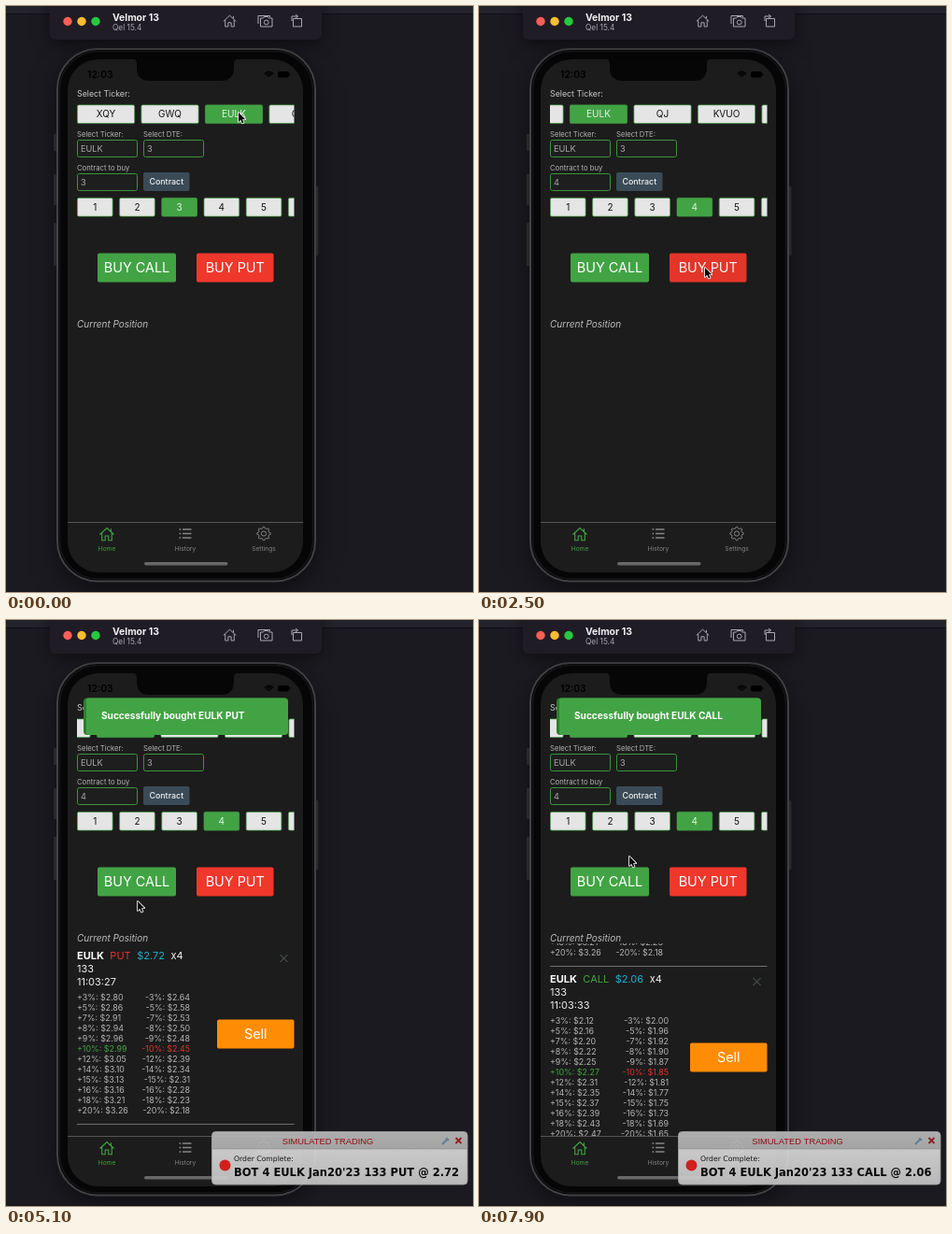
Recreate the animation shown at these times as an HTML page with a canvas. Size 500 by 627 pixels, loop 8 s.

```html
<!DOCTYPE html>
<html lang="en">
<head>
<meta charset="utf-8">
<title>Trading app demo</title>
<style>
  html, body { margin: 0; width: 100%; height: 100%; overflow: hidden; background: #1b1a20; }
  canvas { display: block; }
</style>
</head>
<body>
<canvas id="stage" width="500" height="627"></canvas>
<script>
const ctx = document.getElementById('stage').getContext('2d');
const LOOP = 8000, STEP = 100;
const UI = 'Inter, Roboto, sans-serif';
const WIDE = '"DejaVu Sans", sans-serif';
const GREEN = '#42a344', RED = '#f0372c', PALE = '#e5e5e5', SCREEN = '#1c1c1c';
const TICKERS = ['XQY', 'GWQ', 'EULK', 'QJ', 'KVUO', 'YZLU'];
const PICK = TICKERS[2];
const PERCENTS = [3, 5, 7, 8, 9, 10, 12, 14, 15, 16, 18, 20];

// Keyframes: [time, value, value...], eased between neighbours
const CURSOR = [
  [0, 249, 113], [500, 105, 115], [1000, 234, 218], [1700, 234, 218],
  [2400, 242, 279], [2700, 242, 279], [3400, 218, 298], [4400, 218, 298],
  [5000, 141, 300], [5300, 141, 300], [5600, 141, 281], [5800, 141, 281],
  [6300, 150, 434], [6600, 150, 434], [6700, 155, 460], [7100, 158, 487],
  [7200, 158, 487], [7900, 161, 252]
];
const CAROUSEL = [[0, 0], [600, 178], [1000, 166], [1600, 116]];
const LIST = [[7400, 0], [7900, 170]];
const NOTICE = [[2900, 627], [3300, 547]];
const TOAST_IN = [[3100, 15], [3500, 84.5], [3600, 83.5]];
const TOAST_AGAIN = [[7800, 75], [7900, 83.5]];

function track(keys, t) {
  let i = 0;
  while (i < keys.length - 1 && keys[i + 1][0] <= t) i++;
  const a = keys[i], b = keys[i + 1];
  if (!b || t <= a[0]) return a.slice(1);
  const p = (t - a[0]) / (b[0] - a[0]), e = p * p * (3 - 2 * p);
  return a.slice(1).map((v, k) => v + (b[k + 1] - v) * e);
}

function box(x, y, w, h, r, fill, stroke, line = 1) {
  ctx.beginPath();
  ctx.roundRect(x, y, w, h, r);
  if (fill) { ctx.fillStyle = fill; ctx.fill(); }
  if (stroke) { ctx.strokeStyle = stroke; ctx.lineWidth = line; ctx.stroke(); }
}

function shadowed(blur, drop, draw) {
  ctx.save();
  ctx.shadowColor = 'rgba(0, 0, 0, 0.5)';
  ctx.shadowBlur = blur;
  ctx.shadowOffsetY = drop;
  draw();
  ctx.restore();
}

function text(str, x, y, size, color, { align = 'left', style = '', font = UI } = {}) {
  ctx.font = `${style} ${size}px ${font}`;
  ctx.textAlign = align;
  ctx.fillStyle = color;
  ctx.fillText(str, x, y);
  return ctx.measureText(str).width;
}

function dot(x, y, r, color) {
  ctx.beginPath();
  ctx.arc(x, y, r, 0, Math.PI * 2);
  ctx.fillStyle = color;
  ctx.fill();
}

function icon(path, x, y, color, width = 1, scale = 1) {
  ctx.save();
  ctx.translate(x, y);
  ctx.scale(scale, scale);
  ctx.strokeStyle = color;
  ctx.lineWidth = width;
  ctx.stroke(new Path2D(path));
  ctx.restore();
}

function clipped(x, y, w, h, r, draw) {
  ctx.save();
  ctx.beginPath();
  ctx.roundRect(x, y, w, h, r);
  ctx.clip();
  draw();
  ctx.restore();
}

const HOUSE = 'M-7.5 .5 0-6.5 7.5.5M-5.3-1V6.7H-1.8V2H1.8V6.7H5.3V-1M4.4-2.8V-5.8';
const CROSS = 'M-4-4 4 4M4-4-4 4';
const ARROW = new Path2D('M0 0V11.6L2.6 9.1 4.5 13.3 6.4 12.5 4.6 8.4H8.3Z');

function gearPath() {
  let d = '';
  for (let i = 0; i < 32; i++) {
    const a = (i - 0.5) / 32 * Math.PI * 2, r = i % 4 < 2 ? 7.2 : 5.6;
    d += `${i ? 'L' : 'M'}${r * Math.cos(a)} ${r * Math.sin(a)}`;
  }
  return d + 'ZM2.6 0A2.6 2.6 0 1 1-2.6 0A2.6 2.6 0 1 1 2.6 0';
}
const GEAR = gearPath();

function desktop() {
  ctx.fillStyle = '#1b1a20';
  ctx.fillRect(0, 0, 500, 627);
  ctx.fillStyle = '#24222a';
  ctx.fillRect(0, 0, 500, 8);
  ctx.fillStyle = '#111015';
  ctx.fillRect(0, 8, 500, 1);
}

function titleBar() {
  shadowed(18, 4, () => box(47, -10, 291, 46, 6, '#201c25'));
  ['#fe5f57', '#febc2e', '#28c840'].forEach((c, i) => dot(66 + i * 15, 16.5, 4.7, c));
  text('Velmor 13', 114, 16, 10.4, '#f2f0f4', { style: 'bold' });
  text('Qel 15.4', 114, 26, 8.3, '#a8a5ad');
  const grey = '#aaa7ae';
  icon(HOUSE, 239.5, 16, grey, 1.1, 0.9);
  icon('M-7.5 3V-5.5H5V-4M-5-3H-2L-1-4.5H3L4-3H7.5V6H-5ZM3.6 1.5A2.4 2.4 0 1 1-1.2 1.5A2.4 2.4 0 1 1 3.6 1.5', 277.5, 16, grey);
  icon('M-4-2.5H5V6H-4ZM-5.5 0V-5H1M-1.5-7 1-5-1.5-3', 311.5, 16, grey);
}

function phoneBody() {
  [[51, 137, 18], [51, 180, 33], [51, 232, 46], [330.5, 193, 74]]
    .forEach(([x, y, h]) => box(x, y, 4, h, 1, '#353538'));
  shadowed(28, 8, () => box(55, 46, 276, 569.5, 43, '#060607'));
  box(55, 46, 276, 569.5, 43, null, '#424245', 2);
  box(57.5, 48.5, 271, 564.5, 41, null, '#161618', 1.5);
  box(66, 57, 252, 549, 33, SCREEN);
}

function statusBar() {
  ctx.fillStyle = '#060607';
  ctx.fill(new Path2D('M135 56H249Q244 57 244 62V66Q244 80 230 80H154Q140 80 140 66V62Q140 57 135 56Z'));
  text('12:03', 87, 77, 10.4, '#000', { style: '600' });
  for (let r = 2; r < 7; r += 2) {
    ctx.beginPath();
    ctx.arc(281.5, 76.5, r, -Math.PI * 0.78, -Math.PI * 0.22);
    ctx.strokeStyle = '#000';
    ctx.lineWidth = 1.4;
    ctx.stroke();
  }
  box(291, 70, 12, 6.5, 2, '#000');
  ctx.fillRect(303.5, 72, 1, 2.5);
}

function chip(label, x, y, w, h, on) {
  box(x + 0.4, y + 0.4, w - 0.8, h - 0.8, 1.5, on ? GREEN : PALE, GREEN, 0.7);
  text(label, x + w / 2, y + h / 2 + 3.6, 10, on ? '#e6f3e6' : '#111', { align: 'center' });
}

function field(label, value, x, y) {
  text(label, x, y - 3.5, 7.7, '#b4b4b4');
  box(x + 0.5, y + 0.5, 64, 18, 2, '#1e1e1e', '#3c933e');
  text(value, x + 4, y + 12.8, 9.2, '#a9a9a9');
}

function bigButton(label, x, y, w, color, alpha = 1) {
  ctx.globalAlpha = alpha;
  box(x, y, w, 31, 2, color);
  text(label, x + w / 2, y + 20.8, 14.4, '#fff', { align: 'center' });
  ctx.globalAlpha = 1;
}

function form(t) {
  const count = t < 1300 ? 3 : 4;
  const [shift] = track(CAROUSEL, t);
  text('Select Ticker:', 76, 97, 8.8, '#c9c9c9');
  clipped(76, 104, 232.5, 24, 0, () => TICKERS.forEach((name, i) =>
    chip(name, 76 + i * 68.5 - shift, 105.5, 62, 20.5, name === PICK)));
  field('Select Ticker:', PICK, 76, 143);
  field('Select DTE:', '3', 147, 143);
  field('Contract to buy', String(count), 76, 179);
  box(147, 178, 49.5, 20, 2, '#3a4b57');
  text('Contract', 171.8, 191.2, 8.9, '#f0f0f0', { align: 'center', style: '500' });
  clipped(76, 204, 232.5, 23, 0, () => {
    for (let n = 1; n < 7; n++) chip(String(n), 30.8 + n * 45.2, 205, 38.5, 20.5, n === count);
  });
  bigButton('BUY CALL', 98, 264.5, 84, GREEN, t >= 5600 && t < 5800 ? 0.9 : 1);
  bigButton('BUY PUT', 204, 264.5, 82.5, RED, t >= 2400 && t < 2700 ? 0.95 : 1);
  text('Current Position', 76, 344, 10, '#bdbdbd', { style: 'italic' });
}

// y is the middle of the heading line
function position(y, kind, price, time, right) {
  const tint = kind === 'PUT' ? '#e5352f' : GREEN;
  let x = 76;
  [[PICK, '#fff', 'bold'], [kind, tint], ['$' + price.toFixed(2), '#1fb2cc'], ['x4', '#f0f0f0']]
    .forEach(([str, color, style = '']) => { x += text(str, x, y + 4, 11, color, { style }) + 6.5; });
  text('133', 76, y + 18, 11, '#ededed');
  text(time, 76, y + 32, 11, '#ededed');
  icon(CROSS, 297.5, y + 3, '#5c6264', 1);
  PERCENTS.forEach((p, i) => {
    const base = y + 47.5 + i * 11, key = p === 10;
    text(`+${p}%: $${(price * (1 + p / 100)).toFixed(2)}`, 76, base, 8.9, key ? GREEN : '#b5b5b5');
    text(`-${p}%: $${(price * (1 - p / 100)).toFixed(2)}`, right, base, 8.9, key ? '#dc352f' : '#b5b5b5', { align: 'right' });
  });
  bigButton('Sell', 226, y + 68.5, 82.5, '#ff8c05');
  ctx.fillStyle = '#707070';
  ctx.fillRect(76, y + 180, 232.5, 1);
}

function positions(t) {
  if (t < 3000) return;
  const y = 360 - track(LIST, t)[0] - (t >= 3600 && t < 5200 ? 1 : 0);
  clipped(66, 346, 252, 206, 0, () => {
    position(y, 'PUT', 2.72, '11:03:27', 197);
    if (t >= 7300) position(y + 194, 'CALL', 2.06, '11:03:33', 203);
  });
}

function tabBar() {
  ctx.fillStyle = '#565656';
  ctx.fillRect(66, 552, 252, 1);
  const grey = '#858585';
  icon(HOUSE, 108, 565, GREEN, 1.1);
  icon('M-3-4.5H6.5M-3 0H6.5M-3 4.5H6.5M-6.5-4.5H-4.7M-6.5 0H-4.7M-6.5 4.5H-4.7', 192, 564.5, grey, 1.4);
  icon(GEAR, 276, 564.5, grey, 1);
  [['Home', GREEN], ['History', grey], ['Settings', grey]]
    .forEach(([s, c], i) => text(s, 108 + i * 84, 582.5, 6.6, c, { align: 'center' }));
  box(148, 595, 89.5, 3.5, 1.8, '#686868');
}

function toast(t) {
  const again = t >= 7800;
  if (!again && (t < 3100 || t >= 5200)) return;
  const [y] = track(again ? TOAST_AGAIN : TOAST_IN, t);
  clipped(66, 57, 252, 549, 33, () => {
    box(83, y, 219, 39.5, 4, '#2b802d');
    box(86, y, 216, 39.5, [2, 4, 4, 2], GREEN);
    text(`Successfully bought ${PICK} ${again ? 'CALL' : 'PUT'}`, 102, y + 22.7, 10.1, '#fff', { style: 'bold' });
  });
}

function notice(t) {
  if (t < 3000) return;
  const [y] = track(NOTICE, t), call = t >= 7300, x = call ? 213 : 220;
  const shade = ctx.createLinearGradient(0, y, 0, y + 57);
  shade.addColorStop(0, '#bcbcbc');
  shade.addColorStop(0.33, '#b2b2b2');
  shade.addColorStop(0.34, '#dadada');
  shade.addColorStop(1, '#c8c8c8');
  ctx.globalAlpha = 0.91;
  box(x + 0.5, y + 0.5, 493.5 - x, 56.5, 4, shade, '#a2a2a2');
  ctx.globalAlpha = 1;
  ctx.fillStyle = '#939393';
  ctx.fillRect(x + 1, y + 18.5, 493 - x, 0.8);
  text('SIMULATED TRADING', call ? 341 : 344.5, y + 14, 9.4, '#930c10',
    { align: 'center', font: '"Liberation Sans", sans-serif' });
  icon('M-3.5 3.5 2-2M1-3.5 1.8-1.7 3.8-1', 470.5, y + 10.5, '#5c7f96', 2);
  icon(CROSS, 484.5, y + 10, '#8c1f1f', 2.4, 0.75);
  dot(x + 14.5, y + 36.5, 6, '#d01f1f');
  text('Order Complete:', x + 24, y + 32, 7.7, '#161616', { font: WIDE });
  text(`BOT 4 ${PICK} Jan20'23 133 ${call ? 'CALL @ 2.06' : 'PUT @ 2.72'}`, x + 24, y + 47.5, 11.5, '#090909',
    { style: 'bold', font: WIDE });
}

function pointer(t) {
  const [x, y] = track(CURSOR, t);
  ctx.save();
  ctx.translate(x, y + 1);
  ctx.scale(0.86, 0.86);
  ctx.lineJoin = 'round';
  ctx.lineWidth = 2;
  ctx.strokeStyle = '#f4f4f4';
  ctx.stroke(ARROW);
  ctx.fillStyle = '#050505';
  ctx.fill(ARROW);
  ctx.restore();
}

function draw(t) {
  desktop();
  phoneBody();
  titleBar();
  form(t);
  positions(t);
  tabBar();
  statusBar();
  toast(t);
  notice(t);
  pointer(t);
}

const start = performance.now();
function tick(now) {
  const t = Math.max(0, now - start) % LOOP;
  draw(Math.floor(t / STEP) * STEP);
  requestAnimationFrame(tick);
}
tick(start);
</script>
</body>
</html>
```
